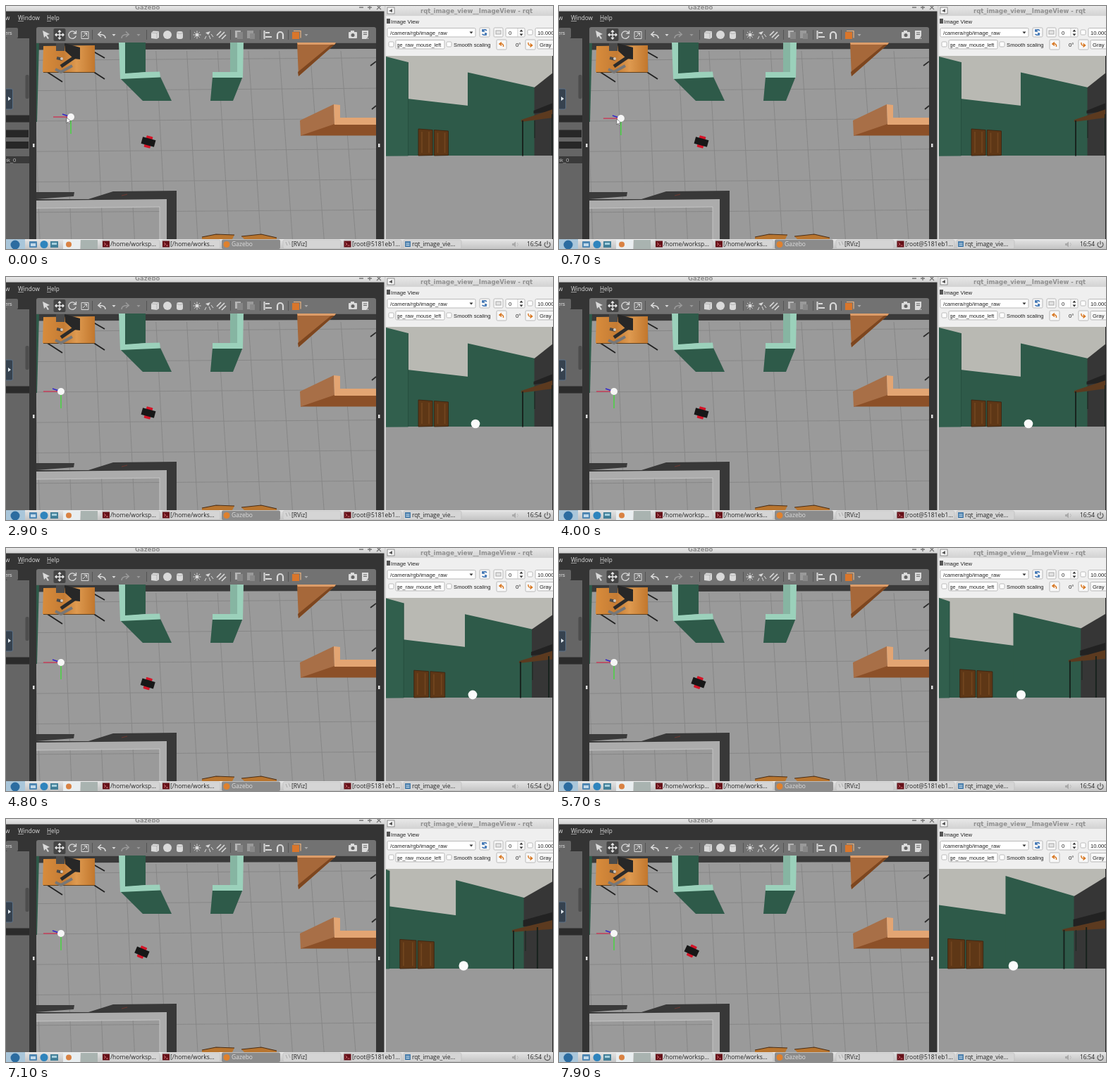
An HTML page that plays this animation: 776x346 px, repeating every 8000 ms.

```html
<!DOCTYPE html>
<html lang="en">
<head>
<meta charset="utf-8">
<title>Simulator desktop</title>
<style>
  html, body { margin: 0; width: 100%; height: 100%; overflow: hidden; background: #353535; }
  svg { display: block; width: 776px; height: 346px; }
  text { white-space: pre; }
  .ui { font-family: "Liberation Sans", Arial, sans-serif; font-size: 7.7px; fill: #222; }
  .bar { font-family: "Open Sans", "Noto Sans", sans-serif; font-size: 8.5px; fill: #222; }
  .menu { font-family: "Open Sans", "Noto Sans", sans-serif; font-size: 8.2px; fill: #ddd; }
  .title { font-family: "DejaVu Sans", sans-serif; font-size: 8.5px; font-weight: bold; fill: #909090; }
</style>
</head>
<body>
<svg id="stage" viewBox="0 0 776 346" xmlns="http://www.w3.org/2000/svg"></svg>
<script>
const rect = (x, y, w, h, fill, extra = '') => `<rect x="${x}" y="${y}" width="${w}" height="${h}" fill="${fill}" ${extra}/>`;
const poly = (points, fill, extra = '') => `<polygon points="${points}" fill="${fill}" ${extra}/>`;
const path = (d, stroke, width = 1, extra = '') => `<path d="${d}" stroke="${stroke}" stroke-width="${width}" fill="none" ${extra}/>`;
const disc = (x, y, r, fill, extra = '') => `<circle cx="${x}" cy="${y}" r="${r}" fill="${fill}" ${extra}/>`;
const text = (x, y, str, cls, extra = '') => `<text x="${x}" y="${y}" class="${cls}" ${extra}>${str}</text>`;
const range = n => [...Array(n).keys()];
const box = (x, y, w, h, fill = '#fff') => rect(x, y, w, h, fill, 'stroke="#aaa" stroke-width=".8" rx="1.5"');
const caret = (x, y, fill) => poly(`${x - 2.5},${y} ${x + 2.5},${y} ${x},${y + 3}`, fill);

const GREEN = '#2e5a49', MINT = '#9bd1bb', DARK = '#343434', PANEL = '#656565', ICON = '#dadada', DIM = '#9a9a9a';

function defs() {
  const grad = (id, a, b) => `<linearGradient id="${id}" x2="0" y2="1"><stop stop-color="${a}"/><stop offset="1" stop-color="${b}"/></linearGradient>`;
  const clip = (id, x, y, w, h) => `<clipPath id="${id}">${rect(x, y, w, h, '#000')}</clipPath>`;
  return `<defs>${grad('chrome', '#e8e8e8', '#d2d2d2')}${grad('task', '#e4e4e4', '#c4c4c4')}
    <linearGradient id="wood"><stop stop-color="#d88c3c"/><stop offset=".4" stop-color="#c57c34"/>
      <stop offset=".65" stop-color="#de9a50"/><stop offset="1" stop-color="#c2772d"/></linearGradient>
    ${clip('scene', 43, 52, 482, 280)}${clip('camera', 539, 71, 236, 261)}${clip('topic', 555, 49, 66, 13)}</defs>`;
}

function simulatorFrame() {
  return rect(0, 0, 538, 332, DARK) + rect(0, 0, 538, 7.5, 'url(#chrome)') +
    text(183, 5, 'Gazebo', 'title') +
    path('M501 2h6M513 2h6M516 -1v6M526 -1l6 6M532 -1l-6 6', '#777', 1.3) +
    text(-1, 20, 'w', 'menu') + text(17, 20, 'Window', 'menu') + text(58, 20, 'Help', 'menu') +
    path('M17 21.5h8M58 21.5h6', '#ccc', .7) +
    rect(0, 31, 17, 15, PANEL, 'rx="2"') + text(-2, 41, 'ers', 'ui', 'style="fill:#ddd"') +
    rect(0, 46, 33, 286, PANEL) + rect(27.5, 98, 5, 34, '#4d4d4d', 'rx="2"') +
    rect(0, 155.5, 33, 10, '#2b2b2b') +
    `<g id="fields">${rect(0, 176.5, 32, 10.5, '#272727')}${rect(0, 193, 32, 10, '#272727')}
      ${rect(0, 214, 33, 10, '#3a3a3a')}${text(-4, 221.5, 'ink_0', 'ui', 'style="fill:#bbb"')}</g>` +
    rect(-3, 118, 12.5, 29, '#36424f', 'rx="2" stroke="#5c7186"') + poly('3,129 7,132 3,135', '#e6eef5') +
    rect(38, 196, 2.5, 5, '#ddd') + rect(528, 196, 2.5, 5, '#ddd') +
    rect(536.5, 0, 2.5, 332, '#d5d5d5');
}

function toolbar() {
  const sun = x => disc(x, 41, 2.5, ICON) + path(`M${x} 35.5v11M${x - 5.5} 41h11M${x - 4} 37l8 8M${x + 4} 37l-8 8`, ICON, 1, 'stroke-dasharray="2.2 6.6"');
  const turn = (x, dir, color) => path('M6 46q0 -6 -10 -5.5m4 -4l-4.2 4l4.2 3.5', color, 1.6, `transform="translate(${x} 0) scale(${dir} 1)"`);
  return rect(43, 30, 482, 25, '#727272', 'rx="3"') + rect(67.5, 32, 17, 18, '#454545', 'rx="2"') +
    poly('52,35 62,40 58,41.5 61,46 59,47 56.5,42.5 54,45', ICON) +
    path('M76 35v12M70 41h12M74 37l2 -2l2 2M74 45l2 2l2 -2M72 39l-2 2l2 2M80 39l2 2l-2 2', '#eee', 1.3) +
    path('M98.5 38a5.3 5.3 0 1 0 .8 4.5M99.5 35v4h-4', ICON, 1.3) +
    path('M107 36.5h10v10h-10zM109 44l5 -5M110.5 38.5h4v4', ICON, 1) +
    turn(135, 1, ICON) + caret(153, 40, ICON) + turn(170, -1, DIM) + caret(188, 40, DIM) +
    poly('206,38 209,35.5 217,36 217,45 214,47 206,46', ICON) + path('M206 38l8 .5v8M214 38.5l3 -2', '#999', .6) +
    disc(229, 41, 6, ICON) + rect(242, 36, 9, 11, ICON, 'rx="3"') + path('M242 38.5q4.5 2 9 0', '#999', .6) +
    sun(271) + poly('283,38 290,36 287,41', ICON) + path('M284 43l-2 4M288 42l2 5M291 40l3 4', ICON) +
    path('M299 42l6 -6M302 45l8 -8M306 47l6 -6', ICON, 1.7) +
    rect(325, 35, 8, 10, '#b5b5b5') + rect(328, 37, 8, 10, '#868686') + rect(342, 35, 9, 11, DIM) + rect(346, 39, 7, 8, '#888') +
    path('M366.5 35v12M368 38h6M368 44h9', ICON, 2) +
    path('M385 47v-6a4 4 0 0 1 8 0v6', ICON, 2.2) +
    rect(406, 37, 10, 10, '#d9762b') + path('M408 35.5h10v10', '#eeb37c', 1.2) + caret(426, 40, '#aaa') +
    rect(486, 37, 12, 9, ICON, 'rx="1"') + rect(489, 35, 5, 3, ICON) + disc(492, 41.5, 2.5, '#666') +
    rect(505, 35, 9, 12, ICON) + path('M507 38h5M507 40.5h5M512 47l3 -5', '#666') +
    path([122, 199, 261, 318, 360, 400].map(x => `M${x}.5 34v14`).join(''), '#555');
}

function scene() {
  const across = range(8).map(k => `M43 ${34 + 43.3 * k}L525 ${30.5 + 43.3 * k}`).join('');
  const along = range(11).map(k => `M${38 + 43.7 * k} 64L${48 + 44.8 * k} 332`).join('');
  return `<g clip-path="url(#scene)">` + rect(43, 52, 482, 280, '#9a9a9a') +
    path(across + along, '#858585', .9) +
    poly('43,52.5 525,52.5 525,61 43,62.5', '#393939') + poly('43,53 47,53 44,165 43,165', GREEN) +
    path('M119 62l21 12M120 91l20 13M57 93l23 15', '#202020', 1.8) +
    poly('53,57 126,56 126,94 52,94', 'url(#wood)') + path('M53 94.5h73', '#60401d') +
    path('M97 73L78 86', '#2b2b2b', 5) + path('M70 90l8 4l16 -9', '#777', 4) +
    poly('83,53 105,59 105,76 96,75 84,64', '#272727') +
    rect(71, 53, 12, 11, '#4b4b4b') + path('M72 74l8 2', '#4a4a4a', 4) + disc(79, 75, 2, '#d2c8bc') +
    poly('168,52 198,52 198,94 168,97', GREEN) + poly('162,103 219,101 235,135 194,135', GREEN) +
    poly('160,52 169,52 169,96 198,94 218,93.5 219,101.5 162,104', MINT) +
    poly('318,52 328,52 328,95 318,95', '#86b5a2') + poly('293,101 336,100 322,135 290,135', GREEN) +
    poly('328,52 337,52 336,102 293,102 293,94 328,94', MINT) +
    poly('413,53 468,53 415,100', '#a6683a') + poly('468,53 460,56 414,94 415,100', '#7d461f') +
    poly('413,52 468,52 466,55 414,55', '#dd9d69') +
    poly('417,163 465,140 466,169 418,185', '#a86f47') + poly('418,184.5 466,168 525,168 525,184.5', '#8c5028') +
    poly('465,140 474,141 474,159 525,159 525,169 466,169', '#e3a573') +
    path('M517 85l8 -6M519 147l6 -5', '#2b2b2b', 1.8) +
    poly('43,265 97,265 96,271 43,275', '#3a3a3a') +
    poly('117,275 152,264 242,263 242,332 228,332 228,276 43,278 43,275', '#383838') +
    poly('43,277 228,275 228,332 218,332 218,286 43,288', '#acacac') +
    path('M43 288L218 286V332', '#c8c8c8', .9) + path('M164 270l8 -2', '#713931') +
    poly('278,329 298,325 324,326 321,332 278,332', '#b8752f') + poly('334,328 362,325 384,330 384,332 338,332', '#b8752f') +
    path('M278 329l20 -4l26 1M334 328l28 -3l22 5', '#4b2d14', 1.2) +
    `<g id="robot">${rect(-4.5, -8.5, 9, 17, '#d41528', 'rx="1"')}${rect(-9.5, -5, 19, 10, '#171717')}</g>` +
    `<g id="marker">${path('M0 0H-25', '#d2294c', 1.2)}${path('M0 0V24', '#43d83c', 1.4)}
      ${path('M0 0L-12 -4', '#3426c8', 1.6)}${disc(0, 0, 5, '#f6f6f6')}</g>` +
    poly('0,0 0,8 2,6 4,9 5,8 3.5,5.5 6,5', '#fff', 'id="cursor" stroke="#333" stroke-width=".5"') + '</g>';
}

function viewerFrame() {
  return rect(539, 0, 237, 332, '#efefef') + rect(539, 0, 237, 14, 'url(#chrome)') +
    rect(541, 2, 10, 9, '#f7f7f7', 'stroke="#777" stroke-width=".8"') + poly('543,7 548,4 548,9', '#555') +
    text(588, 10, 'rqt_image_view__ImageView - rqt', 'title') +
    rect(540, 18, 5, 7, '#555') + text(546, 24.5, 'Image View', 'ui') +
    box(541, 31.5, 125, 12.5) + text(545, 40.5, '/camera/rgb/image_raw', 'ui') + caret(660, 36.5, '#333') +
    box(672, 31, 14, 13, '#f8f8f8') + path('M675.5 36a4 4 0 0 1 6.5 -1M682 39a4 4 0 0 1 -6.5 1M676 33v3h3M681 42v-3h-2', '#2d68ad', 1.4) +
    box(692, 31, 13, 13, '#f8f8f8') + rect(695, 35, 7, 5, '#e4e4e4', 'stroke="#aaa"') +
    box(709, 31.5, 27, 12.5) + text(713, 40.5, '0', 'ui') + path('M726 32v12', '#ccc') +
    caret(731, 39.5, '#333') + poly('728.5,36.5 733.5,36.5 731,33.5', '#333') +
    box(740, 34, 7, 7) + box(751, 31.5, 30, 12.5) + text(754, 40.5, '10.000', 'ui') +
    box(543, 51, 7, 7) + box(553, 48.5, 69, 12.5) +
    `<g clip-path="url(#topic)">${text(554.5, 57.5, 'ge_raw_mouse_left', 'ui', 'style="font-size:7.2px"')}</g>` +
    box(625, 51, 7, 7) + text(635, 57.5, 'Smooth scaling', 'ui') +
    box(696, 48, 14, 14, '#f8f8f8') + path('M705.5 58q1 -5 -5 -4m2.5 -2.5l-3 2.5l3 2.5', '#d7741c', 1.5) +
    text(723, 57.5, '0°', 'ui') +
    box(737, 48, 14, 14, '#f8f8f8') + path('M741 52q-1 5 5 4m-2.5 -2.5l3 2.5l-3 2.5', '#d7741c', 1.5) +
    box(754, 48.5, 25, 12.5, '#f8f8f8') + text(757, 57.5, 'Gray', 'ui');
}

function taskbar() {
  const button = (x, w, label) => rect(x, 333, w, 12.5, '#d5d5d5', 'rx="2" stroke="#bbb" stroke-width=".6"') + text(x + 12, 342, label, 'bar');
  const terminal = x => rect(x, 334.5, 10, 9, '#651018') + path(`M${x + 2} 337l2.5 2l-2.5 2M${x + 5} 341h3`, '#e27b82', .9);
  return rect(0, 332, 776, 14, 'url(#task)') + path('M0 332.5H776', '#f0f0f0') +
    rect(0, 332, 27, 14, '#a9c6da') + disc(13, 340, 6.5, '#2c6ca0') +
    rect(33, 335, 11, 9, '#4f87b3', 'rx="1"') + rect(35, 338, 7, 4, '#c1d9ea') +
    disc(54, 339.5, 5.5, '#2f84bd') + rect(63, 335, 11, 9, '#427f98') + rect(65, 337, 7, 3, '#a5cfdd') +
    rect(81, 333, 24, 13, '#e9eef0') + disc(89, 339.5, 4, '#d98243') + rect(106, 333, 24, 13, '#a9b3b0') +
    button(136, 82, '/home/worksp...') + terminal(137) + button(221, 83, '[/home/works...') + terminal(222) +
    rect(306, 332.5, 83, 13.5, '#8b8b8b', 'rx="2"') + disc(313, 339.5, 4.5, '#df812e') + text(320, 342, 'Gazebo', 'bar', 'style="fill:#ddd"') +
    button(393, 82, '[RViz]') + path('M397 336l2 5M401 335l2 5', '#aaa') +
    button(479, 82, '[root@5181eb1...') + terminal(479.5) +
    button(564, 82, 'rqt_image_vie...') + rect(566, 335, 8, 8, '#477caa') + path('M567.5 338h5M567.5 340.5h5', '#dcecf5') +
    poly('718,338 720,338 723,335.5 723,343.5 720,341 718,341', '#aaa') + path('M725 337q3 2.5 0 5', '#bbb') +
    text(739, 342, '16:54', 'bar', 'style="font-size:8.2px"') +
    path('M765.5 336.5a4 4 0 1 0 5 0M768 334.5v5', '#555', 1.2);
}

// Robot's view; p is the horizontal drift of the ball in pixels.
function cameraView(p, hasBall) {
  const q = p / 21.5;
  const near = 570.5 - 1.57 * p, corner = 655 - p, side = 749.5 - .88 * p;
  const nearTop = 80 - 8 * q, cornerTop = 94.5 - 13.5 * q ** 2.5, sideTop = 116 - 6 * q * q;
  const doorL = 585 - 1.55 * p, doorR = 627.5 - 1.2 * p, doorMid = (doorL + doorR) / 2;
  const table = 731 - .77 * p, tableY = 163 - 5 * q, leg = 775 - 1.25 * p;
  const door = (a, b, top) => poly(`${a},${top} ${b},${top + 1.5} ${b},212.5 ${a},213`, '#5e3716', 'stroke="#3f2410" stroke-width=".9"') +
    path(`M${a + 5} ${top + 4}V209M${b - 5} ${top + 4}V209`, '#71451f', 1.8);
  return rect(539, 71, 237, 143, '#b9b9b3') + rect(539, 213, 237, 119, '#999') +
    poly(`${near - 1},${132 - 10 * q} ${corner + 1},${142 - 6 * q} ${corner + 1},213 ${near - 1},213`, GREEN) +
    door(doorL, doorMid - 1.2, 175 - 4.5 * q) + door(doorMid + 1.2, doorR, 176.5 - 4 * q) +
    (near > 539 ? poly(`500,${nearTop - 18} ${near},${nearTop} ${near},213.5 500,214`, '#315f4d') + path(`M${near} ${nearTop}V213`, '#244b3c', .8) : '') +
    poly(`${corner},${cornerTop} ${side + 1},${sideTop} ${side + 1},213 ${corner},213`, GREEN) +
    poly(`${side},${sideTop} 776,${95 - 13 * q ** 3} 776,213 ${side},213`, '#363636') +
    poly(`${side - 1},${149 - 6 * q} 776,${138 - 7 * q} 776,150 ${side - 1},153`, '#222') +
    poly(`${table},${tableY - 1} 776,${147 - 4 * q} 776,${159 - 3 * q} ${table},${tableY + 2}`, '#5c3a1f') +
    path(`M${table + 2} ${tableY}V213.5M${leg} 154V213`, '#18231e', 2) +
    path(`M${table + 19} ${tableY}V188`, '#1d2a24', 1.2) +
    (hasBall ? disc(666 - p, 209, 6.3 + .5 * q, '#fbfbfb') : '');
}

const svg = document.getElementById('stage');
svg.innerHTML = defs() + simulatorFrame() + toolbar() + scene() + viewerFrame() +
  `<g id="view" clip-path="url(#camera)"></g>` + rect(775, 71, 1, 261, '#222') + taskbar();
const [fields, robot, marker, cursor, view] = ['fields', 'robot', 'marker', 'cursor', 'view'].map(id => document.getElementById(id));

function track(t, keys) {
  const i = keys.findIndex(([at]) => at > t);
  if (i === 0) return keys[0][1];
  if (i < 0) return keys[keys.length - 1][1];
  const [t0, a] = keys[i - 1], [t1, b] = keys[i];
  return a + (b - a) * (t - t0) / (t1 - t0);
}

const DRIFT = [[4000, 0], [4800, 4], [5700, 10.5], [6600, 14], [7900, 21.5]];
const MARKER_X = [[0, 92], [1700, 82], [2200, 78]];
const MARKER_Y = [[0, 158], [1700, 163]];
const DROP_TIME = 2300;

function render(t) {
  const p = track(t, DRIFT), q = p / 21.5, dropped = t >= DROP_TIME;
  const x = track(t, MARKER_X), y = track(t, MARKER_Y);
  fields.setAttribute('visibility', dropped ? 'hidden' : 'visible');
  cursor.setAttribute('visibility', dropped ? 'hidden' : 'visible');
  cursor.setAttribute('transform', `translate(${x - 6} ${y + 1})`);
  marker.setAttribute('transform', `translate(${x} ${y})`);
  robot.setAttribute('transform', `translate(${202 - 13.7 * q ** 1.7} ${193.5 - 5.5 * q ** 1.5}) rotate(${15 + 10 * q})`);
  view.innerHTML = cameraView(p, dropped);
}

const LOOP = 8000, STEP = 100, start = performance.now();
function frame(now) {
  const t = Math.max(0, now - start) % LOOP;
  render(Math.floor(t / STEP) * STEP);
  requestAnimationFrame(frame);
}
render(0);
requestAnimationFrame(frame);
</script>
</body>
</html>
```
